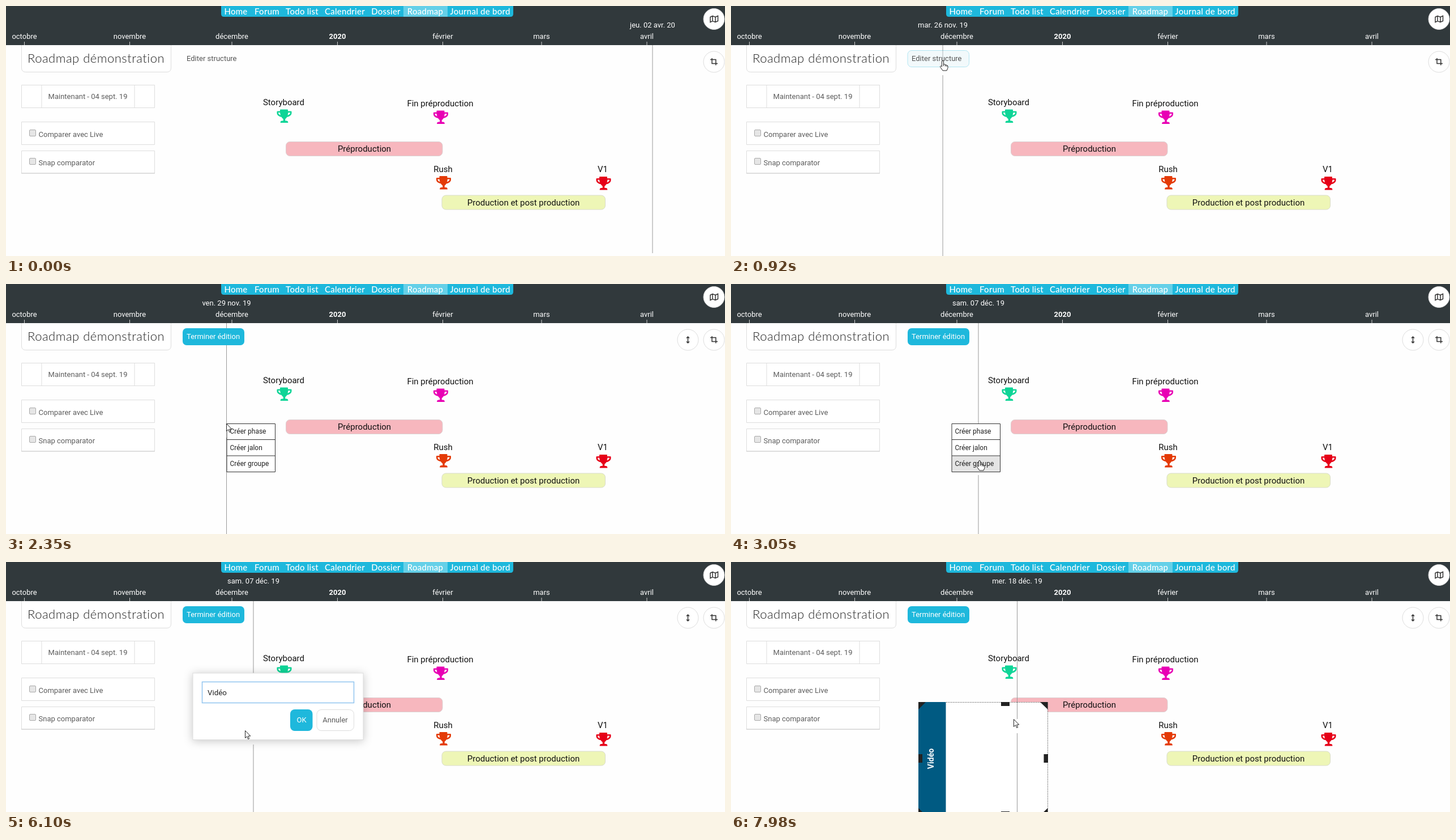
Recreate the animation shown at these times as an HTML page. Size 1270 by 441 pixels, loop 8000 ms.

```html
<!DOCTYPE html>
<html lang="fr">
<head>
<meta charset="utf-8">
<title>Roadmap</title>
<style>
  html, body { margin: 0; width: 100%; height: 100%; overflow: hidden; background: #fefefe; }
  svg { display: block; width: 100%; height: 100%; font: 13px Roboto, sans-serif; }
  .mid { text-anchor: middle; }
  .nav { font: 500 15px Lato, sans-serif; letter-spacing: .25px; fill: #fff; }
  .title { font: 300 22px Lato, sans-serif; letter-spacing: .5px; fill: #222; }
  .light { fill: #fff; }
  .grey { fill: #5c5c5c; }
  .big { font-size: 15px; fill: #111; }
  .menu { font-size: 12px; fill: #222; }
  .field { font-size: 13.33px; fill: #222; }
  .box { fill: #fff; stroke: #ddd; }
  .accent { fill: #1eb8dc; }
  .hover { fill: #dcf0f7; stroke: #1eb8dc; }
  .icon { fill: none; stroke: #333; stroke-width: 1.5; }
  .handle { fill: #222; }
  .panel { filter: drop-shadow(0 2px 8px rgba(0, 0, 0, .22)); }
</style>
</head>
<body>
<svg viewBox="0 0 1270 441">
  <defs>
    <path id="cup" fill-rule="evenodd" d="M6.5 0H18.5Q19.5 0 19.5 1V3H25Q26 3 26 4V6.5C26 10 22 12.8 18 13.2Q16.5 15.7 14.8 16.7V20H17Q19.8 20 19.8 23V23.5H6.2V23Q6.2 20 9 20H11.2V16.7Q9.500 15.7 8 13.200C4 12.8 0 10 0 6.5V4Q0 3 1 3H5.500V1Q5.500 0 6.500 0ZM2.500 5.500V6.500Q3 8.800 6.500 10.200Q5.700 8 5.600 5.500ZM23.500 5.500H19.900Q19.800 8 19 10.200Q23 8.800 23.500 6.500Z"/>
  </defs>

  <rect width="1270" height="69" fill="#31393c"/>
  <path class="accent" d="M380 0H896V14Q896 19 891 19H385Q380 19 380 14Z"/>
  <rect x="702" width="78" height="19" fill="#65d0e8"/>
  <g id="nav" class="nav mid"></g>
  <g id="months" class="light mid"></g>
  <text id="date" class="light mid" y="38"></text>

  <path class="box" d="M27.500 69V109Q27.500 116.500 35 116.500H284Q291.500 116.500 291.500 109V69"/>
  <text class="title" x="38" y="100">Roadmap démonstration</text>
  <path class="box" d="M27.500 139.500H262.500V179.500H27.500ZM63 139.500V179.500M227 139.500V179.500M27.500 204.500H262.500V244.500H27.500ZM27.500 255.500H262.500V295H27.500Z"/>
  <path d="M27 295H263" stroke="#ccc"/>
  <g fill="#e6e6e6" stroke="#aaa">
    <rect x="41.500" y="218.500" width="11" height="11" rx="1.500"/>
    <rect x="41.500" y="268.500" width="11" height="11" rx="1.500"/>
  </g>
  <g class="grey">
    <text class="mid" x="144.500" y="164">Maintenant - 04 sept. 19</text>
    <text x="57.500" y="231">Comparer avec Live</text>
    <text x="57.500" y="281">Snap comparator</text>
  </g>

  <circle class="box" cx="1250.500" cy="23" r="18.500"/>
  <path class="icon" stroke-width="1.200" d="M1244 19.500L1248 17.500 1253 19.500 1257.500 17.500V26.500L1253 28.500 1248 26.500 1244 28.500ZM1248 17.500V26.500M1253 19.500V28.500"/>
  <circle class="box" cx="1250.500" cy="98.500" r="18.500"/>
  <path class="icon" stroke-width="1.700" d="M1247 92V101.500H1257M1244 94.500H1253.800V104.500"/>
  <g id="resize">
    <circle class="box" cx="1204.500" cy="98.500" r="18.500"/>
    <path class="icon" d="M1204.500 93V104M1202 95.500L1204.500 93 1207 95.500M1202 101.500L1204.500 104 1207 101.500"/>
  </g>

  <rect x="494.500" y="239.500" width="276.500" height="25" rx="7" fill="#f7b7be" stroke="#dcd0d1"/>
  <rect x="770" y="334" width="288.500" height="25" rx="7" fill="#eef6b6" stroke="#d9dcc8"/>
  <g class="big mid">
    <text x="490.500" y="175">Storyboard</text>
    <text x="767" y="177">Fin préproduction</text>
    <text x="772" y="293">Rush</text>
    <text x="1054" y="293">V1</text>
    <text x="633" y="257">Préproduction</text>
    <text x="914" y="352">Production et post production</text>
  </g>
  <use href="#cup" x="478.500" y="182.500" fill="#0fd597"/>
  <use href="#cup" x="755" y="184.500" fill="#e800b4"/>
  <use href="#cup" x="760" y="300" fill="#e43a07"/>
  <use href="#cup" x="1042.500" y="301" fill="#e60018"/>

  <g id="group">
    <rect x="331" y="247" width="228" height="200" fill="#fff"/>
    <rect x="331" y="247" width="48.500" height="200" fill="#005a82"/>
    <path d="M380 247.500H559.500V441" fill="none" stroke="#555" stroke-dasharray="1.500 1.500"/>
    <path class="handle" d="M331 247H344L331 260ZM559.500 247V260L546 247ZM331 434L344 447H331ZM559.500 434V447H546ZM477 247H492V254H477ZM477 440H492V447H477ZM331 339H338V354H331ZM552.500 339H560V354H552.500Z"/>
    <text class="light mid" font-size="14" font-weight="700" transform="translate(358 347) rotate(-90)">Vidéo</text>
  </g>

  <path id="line" stroke="#999" fill="none"/>

  <g id="button">
    <rect id="solid" class="accent" x="312" y="78" width="109" height="30" rx="7"/>
    <rect id="soft" class="hover" x="312" y="78.500" width="108.500" height="29" rx="7"/>
    <text id="caption" x="319" y="97"></text>
  </g>

  <g id="menu">
    <rect x="390" y="246.500" width="85.500" height="85" fill="#fff"/>
    <rect id="row" x="390" width="85.500" height="28.300" fill="#e4e4e4"/>
    <path d="M390 246.500H475.500V331.500H390ZM390 274.500H475.500M390 303H475.500" fill="none" stroke="#333"/>
    <g class="menu">
      <text x="395.500" y="264">Créer phase</text>
      <text x="395.500" y="293">Créer jalon</text>
      <text x="395.500" y="321">Créer groupe</text>
    </g>
  </g>

  <g id="dialog">
    <rect class="box panel" x="330" y="196" width="301" height="117.500"/>
    <rect x="346.500" y="211.500" width="268" height="37" fill="#fff" stroke="#90c4ef" stroke-width="1.500"/>
    <text id="hint" class="field" x="356" y="235" style="fill:#aaa">Saisissez un nom</text>
    <text id="typed" class="field" x="356" y="235"></text>
    <path id="caret" stroke="#222"/>
    <rect class="accent" x="502" y="260" width="39.500" height="38" rx="8"/>
    <rect id="okHover" class="hover" x="502.500" y="260.500" width="38.500" height="37" rx="8"/>
    <text id="ok" class="mid light" x="522" y="283">OK</text>
    <rect class="box" x="549" y="260.500" width="65.500" height="37" rx="8"/>
    <text class="mid grey" x="581.500" y="283">Annuler</text>
  </g>

  <g id="cursor" stroke="#222" fill="#fff" stroke-linejoin="round">
    <path id="arrow" d="M.500 .500V13.500L3.600 10.700 5.700 15.500 7.700 14.600 5.700 10H9.800Z"/>
    <path id="hand" d="M-1.500 10V1Q-1.500 -.500 0 -.500T1.500 1V6Q4 5 4.500 7Q6.500 6 7 8Q9 7.500 9 9.500V12.500L7 17H0L-4.500 10.500Q-4.500 7.500 -1.500 10ZM1.500 6V9M4.500 7V9.500M7 8V10"/>
  </g>
</svg>
<script>
const $ = id => document.getElementById(id);
const DURATION = 8000;
const clamp = v => Math.max(0, Math.min(1, v));
const fade = (t, from, to) => clamp((t - from) / (to - from));
const show = (id, opacity) => { $(id).style.opacity = +opacity; };
const label = (text, x, y, extra = '') => `<text x="${x}" y="${y}" ${extra}>${text}</text>`;

$('nav').innerHTML = [['Home', 406], ['Forum', 461], ['Todo list', 523], ['Calendrier', 598.5],
  ['Dossier', 671], ['Roadmap', 740.5], ['Journal de bord', 837.5]]
  .map(([text, x]) => label(text, x, 15)).join('');
$('months').innerHTML = [['octobre', 32.5], ['novembre', 218.5], ['décembre', 399], ['2020', 585.5],
  ['février', 771.5], ['mars', 946], ['avril', 1132]]
  .map(([text, x]) => label(text, x, 58, text === '2020' ? 'font-weight="700"' : '') +
    `<path d="M${x} 63V69" stroke="#ccc"/>`).join('');

// Rows are [time, value, value...]; monotone cubic through the points.
function track(keys, t, column = 1) {
  let i = 0;
  while (i < keys.length - 2 && t >= keys[i + 1][0]) i++;
  const slope = k => k < 0 || k >= keys.length - 1 ? 0 :
    (keys[k + 1][column] - keys[k][column]) / (keys[k + 1][0] - keys[k][0]);
  const tangent = k => {
    const a = slope(k - 1), b = slope(k);
    return a * b > 0 ? 2 * a * b / (a + b) : 0;
  };
  const [a, b] = [keys[i], keys[i + 1]], span = b[0] - a[0], s = clamp((t - a[0]) / span);
  return a[column] + (b[column] - a[column]) * s * s * (3 - 2 * s) +
    span * s * (1 - s) * (tangent(i) * (1 - s) - tangent(i + 1) * s);
}

const pointer = [[150, 1136, 436], [530, 581, 205], [950, 372, 96], [1300, 368, 95], [1480, 368, 95],
  [1660, 390.5, 142.5], [1900, 400, 215], [2120, 389, 246], [2690, 389, 246], [3050, 439, 312],
  [3450, 439, 312], [3750, 422, 297], [6250, 422, 297], [6300, 396, 297], [6500, 396, 297],
  [7250, 520, 282], [7900, 520, 282], [7980, 499, 277]];
const guide = [[150, 1142], [530, 587.5], [950, 372], [1300, 368], [1480, 368], [1660, 387.5],
  [1900, 400], [2120, 389.5], [2690, 389.5], [3050, 437]];
const guideEnd = [[7910, 513], [7980, 505.5]];

const days = ['dim.', 'lun.', 'mar.', 'mer.', 'jeu.', 'ven.', 'sam.'];
const months = ['janv.', 'févr.', 'mars', 'avr.', 'mai', 'juin', 'juil.', 'août', 'sept.', 'oct.', 'nov.', 'déc.'];
function dateAt(x) {
  const date = new Date(2019, 9, 1 + Math.floor((x - 32) / 6.011));
  return `${days[date.getDay()]} ${String(date.getDate()).padStart(2, '0')} ` +
    `${months[date.getMonth()]} ${date.getFullYear() % 100}`;
}

const strokes = [4650, 5030, 5260, 5460, 5560];
const caretX = [356.5, 364.5, 368.5, 375.5, 383, 389.5];

function drawGuide(t, y) {
  const x = t < 7910 ? track(guide, t) : track(guideEnd, t);
  $('line').setAttribute('d', `M${x} 69V${Math.max(69, y)}M${x} ${Math.max(69, y + 25)}V441`);
  $('date').setAttribute('x', x);
  $('date').textContent = dateAt(x);
}

function drawButton(t) {
  const editing = t >= 1150, filled = fade(t, 1670, 2100);
  show('solid', editing ? filled : 0);
  show('soft', fade(t, 880, 1000) * (1 - filled));
  $('caption').textContent = editing ? 'Terminer édition' : 'Editer structure';
  const tone = Math.round(85 + 170 * filled);
  $('caption').style.fill = `rgb(${tone},${tone},${tone})`;
  show('resize', fade(t, 1150, 1350));
}

function drawMenu(t, y) {
  show('menu', t >= 2350 && t < 3330);
  show('row', t >= 2690);
  $('row').setAttribute('y', 246.5 + 28.4 * Math.max(0, Math.min(2, Math.floor((y - 246) / 28.4))));
}

function drawDialog(t, overOk) {
  show('dialog', fade(t, 3330, 3600) * (1 - fade(t, 7330, 7600)));
  const count = strokes.filter(s => t >= s).length;
  $('typed').textContent = 'Vidéo'.slice(0, count);
  show('hint', count === 0);
  $('caret').setAttribute('d', `M${caretX[count]} 222V238`);
  const blink = count === 5 ? t < 6100 || (t >= 6600 && t < 7100) : count > 0 || t < 3900 || t >= 4430;
  show('caret', blink);
  show('okHover', overOk);
  $('ok').style.fill = overOk ? '#555' : '#fff';
}

function drawPointer(t, x, y, hand) {
  show('cursor', t >= 150);
  $('cursor').setAttribute('transform', `translate(${x} ${y})`);
  show('arrow', !hand);
  show('hand', hand);
}

function draw() {
  const t = performance.now() % DURATION;
  const x = track(pointer, t), y = track(pointer, t, 2);
  const overOk = t > 6500 && t < 7500 && x > 502;
  const overButton = x < 421 && y < 108;
  drawGuide(t, y);
  drawButton(t);
  drawMenu(t, y);
  show('group', t >= 7400);
  drawDialog(t, overOk);
  drawPointer(t, x, y, overOk || overButton || (t > 2700 && t < 3450));
  requestAnimationFrame(draw);
}
draw();
</script>
</body>
</html>
```
